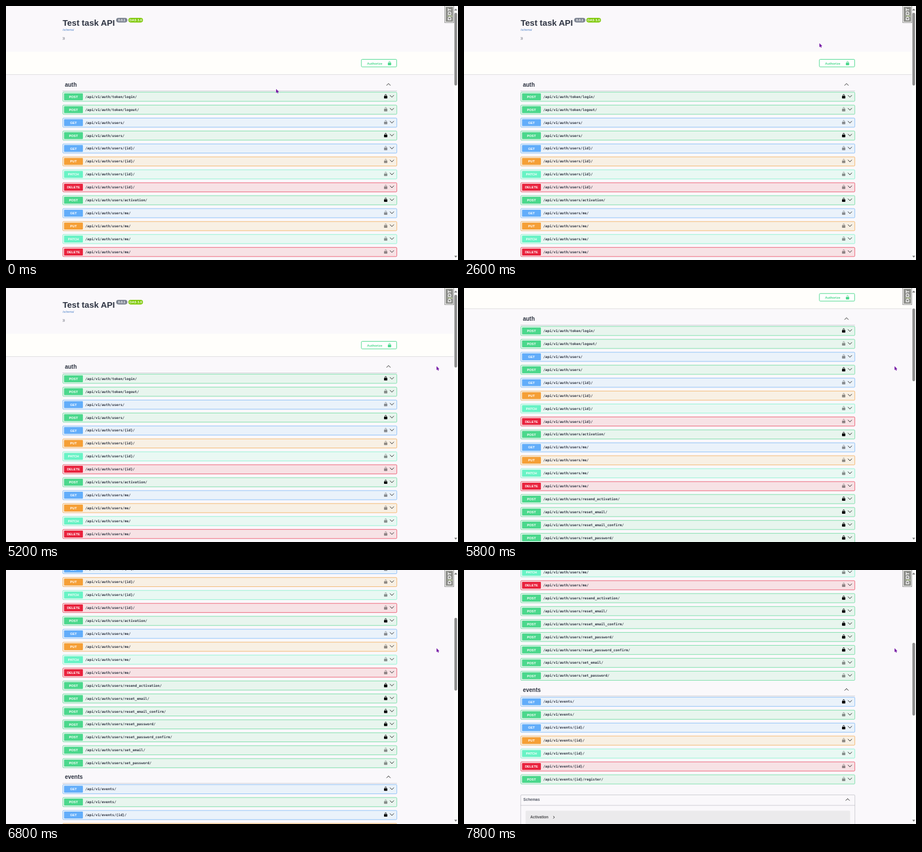
Recreate the animation shown at these times as an HTML page. Size 800 by 450 pixels, loop 8000 ms.

```html
<!DOCTYPE html>
<html lang="en">
<head>
<meta charset="utf-8">
<title>Test task API</title>
<style>
  html, body { margin: 0; width: 100%; height: 100%; overflow: hidden; background: #faf8fb; }
  svg { display: block; width: 100vw; height: 100vh; }
  text { font-family: "Liberation Sans", Arial, sans-serif; font-weight: 700; fill: #2f3543; }
  .path { font: 700 6.09px "DejaVu Sans Mono", monospace; }
  .verb { font-size: 5.83px; fill: #fff; text-anchor: middle; }
  .chev { fill: none; stroke: #222; stroke-width: .95; }
  .rule { stroke: #3b4151; stroke-opacity: .3; stroke-width: .8; }
</style>
</head>
<body>
<svg id="stage" viewBox="0 0 800 450" xmlns="http://www.w3.org/2000/svg">
  <rect width="800" height="450" fill="#faf8fb"/>
  <g id="page"></g>
  <rect x="792.4" width="7.6" height="450" fill="#fcfcfc"/>
  <path d="M793.4 8 L796 4.6 L798.6 8Z M793.4 442.4 L796 445.8 L798.6 442.4Z" fill="#777"/>
  <rect id="thumb" x="793.6" y="12" width="4.8" height="129" rx="2.4" fill="#8c8c8c"/>
  <g>
    <rect x="776.5" y="-.5" width="16" height="30" fill="#f4f4f2" stroke="#999"/>
    <rect x="778.3" y="1.5" width="12.8" height="26.3" fill="#8b8c88"/>
    <text transform="translate(788.2 25.8) rotate(-90)" font-size="9.5" style="fill:#fff">D<tspan fill="#cfe8a8">j</tspan>DT</text>
  </g>
  <path id="cursor" d="M0 0V7L1.7 5.7L2.8 7.8L4.1 7.2L3.1 5.2L5 4.8Z" fill="#7a1fa8"/>
</svg>
<script>
const $ = id => document.getElementById(id);

// badge and border colour, row fill
const COLORS = {
  POST: ['#4bd88c', '#e8f5ee'],
  GET: ['#62adfa', '#eaf2fa'],
  PUT: ['#f59f36', '#f8f0e4'],
  PATCH: ['#68f3c5', '#e9f8f3'],
  DELETE: ['#e9223d', '#f7e2e5']
};

// a trailing * marks a closed lock
const AUTH = `POST token/login/*
POST token/logout/
GET users/
POST users/*
GET users/{id}/
PUT users/{id}/
PATCH users/{id}/
DELETE users/{id}/
POST users/activation/*
GET users/me/
PUT users/me/
PATCH users/me/
DELETE users/me/
POST users/resend_activation/*
POST users/reset_email/*
POST users/reset_email_confirm/*
POST users/reset_password/*
POST users/reset_password_confirm/*
POST users/set_email/
POST users/set_password/`;

const EVENTS = `GET *
POST 
GET {id}/*
PUT {id}/
PATCH {id}/
DELETE {id}/
POST {id}/register/`;

const PITCH = 55 / 2.4;

const text = (x, y, size, str, fill = '#2f3543', weight = 700) =>
  `<text x="${x}" y="${y}" font-size="${size}" style="fill:${fill};font-weight:${weight}">${str}</text>`;

const chevron = (x, y, dir) =>
  `<path class="chev" d="M${x - 3.5} ${y - 1.8 * dir}L${x} ${y + 1.8 * dir}L${x + 3.5} ${y - 1.8 * dir}"/>`;

function lock(x, y, closed, color, alpha) {
  const leg = closed ? 8 : 6;
  return `<g transform="translate(${x - 4.17} ${y - 4.17}) scale(.4167)" opacity="${alpha}">
    <rect x="3" y="8" width="14" height="11" rx="1.8" fill="${color}"/>
    <path d="M7 ${leg}V5.2C7 3 8 2 10 2S13 3 13 5.2V8" fill="none" stroke="${color}" stroke-width="2"/></g>`;
}

function row(line, base, y) {
  const [verb, rest] = line.split(' ');
  const closed = rest.endsWith('*');
  const [color, fill] = COLORS[verb];
  return `<rect x="100" y="${y - 8.5}" width="592.2" height="17" rx="1.9" fill="#000" opacity=".05"/>
    <rect x="100.5" y="${y - 8.1}" width="591.2" height="16.2" rx="1.5" fill="${fill}" stroke="${color}" stroke-width=".8" stroke-opacity=".85"/>
    <rect x="102.7" y="${y - 6.1}" width="33.4" height="12.2" rx="1.25" fill="${color}"/>
    <text class="verb" x="119.4" y="${y + 2.1}">${verb}</text>
    <text class="path" x="140.2" y="${y + 2}">${base}${rest.replace('*', '')}</text>
    ${lock(672, y - .8, closed, '#000', closed ? 1 : .42)}${chevron(683, y - 1, 1)}`;
}

function section(name, base, lines, y) {
  return text(104.2, y + 3.4, 10, name) + chevron(677, y - .4, -1) +
    `<line class="rule" x1="100" x2="692" y1="${y + 11}" y2="${y + 11}"/>` +
    lines.split('\n').map((l, i) => row(l, base, y + 21.3 + i * PITCH)).join('');
}

$('page').innerHTML =
  text(100.2, 34.6, 15, 'Test task API') +
  '<rect x="195" y="21" width="19.8" height="8.2" rx="4.1" fill="#7d8492"/>' +
  text(198.4, 27.2, 5.83, '0.0.1', '#fff') +
  '<rect x="216.6" y="21" width="25.8" height="8.2" rx="4.1" fill="#7fc90a"/>' +
  text(218.3, 27.2, 5.83, 'OAS 3.0', '#fff') +
  text(100.2, 44, 5, '/schema/', '#4a80c8', 400) +
  text(100.2, 59.4, 5.83, '))', '#3b4151', 400) +
  `<rect y="81" width="800" height="40.3" fill="#fffefb"/>
   <rect y="121" width="800" height=".9" fill="#dcdbdd"/>
   <rect x="629" y="94.5" width="62.4" height="13.4" rx="1.6" fill="#fff" stroke="#4bd88c"/>` +
  text(639, 103.5, 5.83, 'Authorize', '#4bd88c') + lock(678.8, 101.2, false, '#4bd88c', 1) +
  section('auth', '/api/v1/auth/', AUTH, 139.5) +
  section('events', '/api/v1/events/', EVENTS, 621) +
  `<rect x="100.4" y="807.2" width="591.4" height="90" rx="1.6" fill="none" class="rule"/>
   <line class="rule" x1="100.4" x2="691.8" y1="825.8" y2="825.8"/>
   <rect x="109" y="835.2" width="574.4" height="24" rx="1.6" fill="#ebeaec"/>` +
  text(105, 817.8, 6.67, 'Schemas', '#555a66') + chevron(679, 815.6, -1) +
  text(117.2, 848.7, 6.67, 'Activation', '#4d4d50') +
  '<path class="chev" d="M158 844.7L160.1 846.9L158 849.1"/>';

// time, x, y
const POINTER = [
  [0, 478, 147], [200, 487, 143], [400, 487, 143], [1000, 622, 70], [2400, 622, 70],
  [2600, 629, 66], [3600, 638, 78], [4200, 690, 128], [4800, 738, 138], [5200, 762, 138.6]
];
// time, offset
const SCROLL = [
  [5200, 0], [5400, 22], [5600, 62], [5800, 84.7], [6000, 98], [6200, 129.2],
  [6600, 222], [6800, 254], [7000, 254], [7800, 408.8]
];

function at(keys, t, col) {
  const n = keys.findIndex(k => k[0] > t);
  if (n < 0) return keys[keys.length - 1][col];
  if (n === 0) return keys[0][col];
  const a = keys[n - 1], b = keys[n];
  return a[col] + (b[col] - a[col]) * (t - a[0]) / (b[0] - a[0]);
}

function draw(now) {
  const t = Math.floor(now % 8000 / 200) * 200;
  const offset = at(SCROLL, t, 1);
  $('page').setAttribute('transform', `translate(0 ${-offset})`);
  $('thumb').setAttribute('y', 12 + offset * .286);
  $('cursor').setAttribute('transform', `translate(${at(POINTER, t, 1)} ${at(POINTER, t, 2)})`);
}

let start;
function tick(now) {
  start ??= now;
  draw(now - start);
  requestAnimationFrame(tick);
}
draw(0);
requestAnimationFrame(tick);
</script>
</body>
</html>
```
